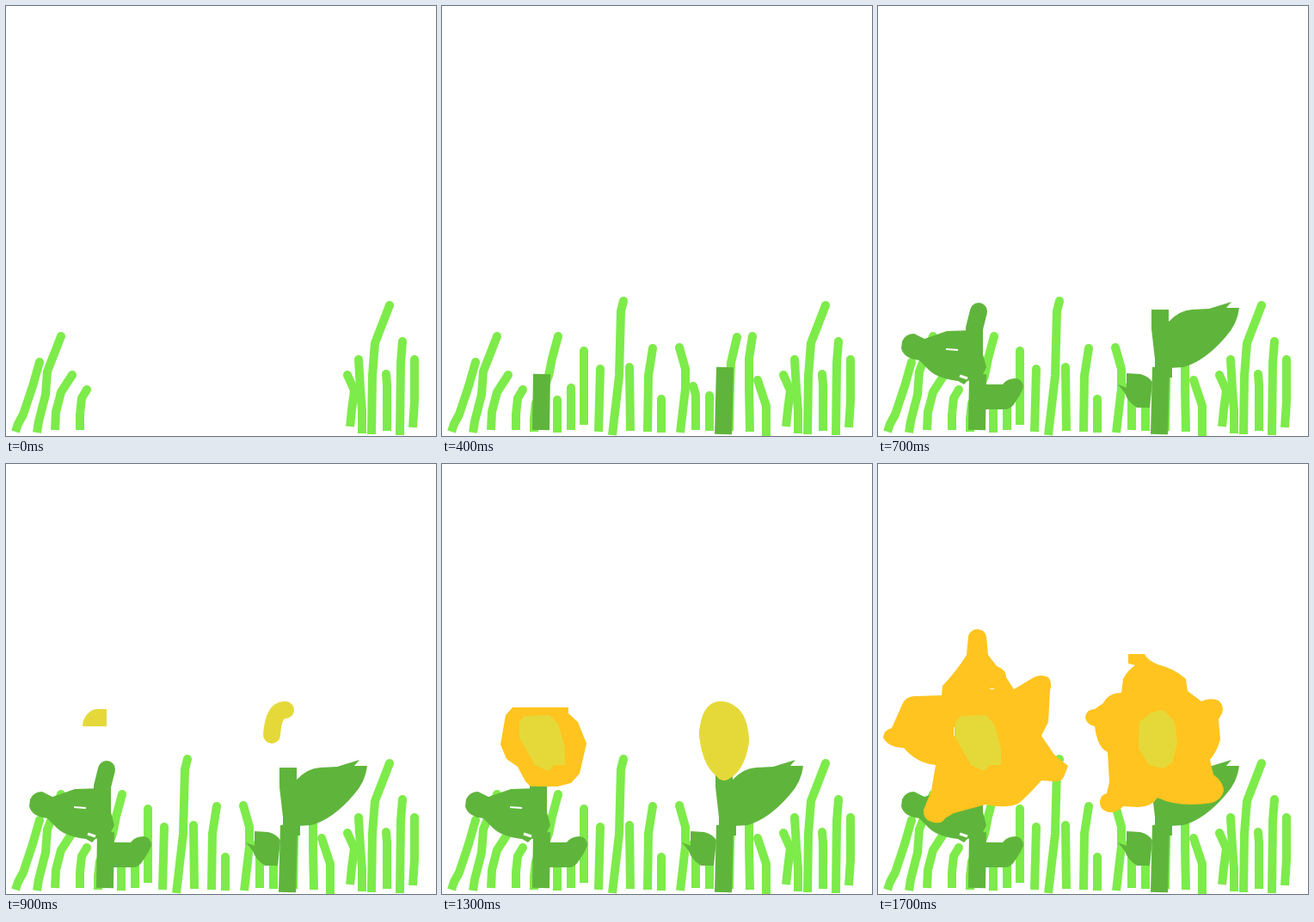
Write an HTML page with a canvas that moves like this. It is 500x500 px and loops after 1800 ms.

```html
<!DOCTYPE html>
<html>
<head>
<meta charset="utf-8">
<title>Growing flowers</title>
<style>
html, body { margin: 0; width: 100%; height: 100%; overflow: hidden; background: #fff; }
canvas { display: block; width: 500px; height: 500px; }
</style>
</head>
<body>
<canvas id="stage" width="500" height="500"></canvas>
<script>
const ctx = document.getElementById('stage').getContext('2d');
const LOOP = 1800;
const GRASS = '#7deb4a', LEAF = '#5fb53b', YELLOW = '#e5d93a', ORANGE = '#ffc41f';
const parts = [];

const fill = (start, color, d) => parts.push({ start, color, path: new Path2D(d) });
const line = (start, color, width, d, cap = 'butt') =>
  parts.push({ start, color, width, cap, path: new Path2D(d) });

// A blade has a round tip and a flat foot.
function blade(start, points, color = GRASS, width = 10) {
  const [x, y] = points.split(' ')[0].split(',');
  line(start, color, width, 'M' + points);
  line(start, color, width, `M${x},${y}h.01`, 'round');
}

[
  [0, '39,414 31,442 20,475 14,486 11,495'],
  [0, '64,384 48,425 46,452 38,483 36,496'],
  [0, '77,429 64,449 58,472 57,493'],
  [0, '94,446 88,456 86,475 86,493'],
  [0, '397,429 405,447 402,470 400,489'],
  [0, '410,411 412,445 414,470 414,497'],
  [0, '446,348 429,392 426,430 425,498'],
  [0, '442,428 443,440 443,494'],
  [0, '461,390 459,415 458,499'],
  [0, '475,411 475,460 473,490'],
  [100, '135,384 128,410 124,430 119,443 109,462 107,480 107,495'],
  [100, '134,458 134,496'],
  [100, '343,385 336,415 335,440 334,494'],
  [100, '361,384 357,410 357,445 358,495'],
  [100, '367,435 377,465 377,500'],
  [200, '165,401 165,487'],
  [200, '245,398 240,430 239,495'],
  [200, '255,457 255,496'],
  [200, '276,397 283,422 283,445 277,496'],
  [200, '292,442 295,452 295,493'],
  [200, '311,453 311,494'],
  [300, '150,444 150,493'],
  [300, '184,422 182,495'],
  [300, '211,343 208,355 206,430 198,499'],
  [300, '218,420 219,494']
].forEach(([start, points]) => blade(start, points));

// Stems
line(400, LEAF, 20, 'M116,428L115,493');
line(400, LEAF, 20, 'M329,420L327,498');
blade(500, '117,355 112,375 112,435', LEAF, 20);
line(500, LEAF, 20, 'M328,353V375L332,410V432');

// Leaves
fill(600, LEAF, 'M28,390Q32,381 42,381L54,387 80,378 110,377 122,405 126,420 120,432 104,436 100,440 93,436Q70,433 60,424L48,412Q30,410 27,398Z');
line(600, '#fff', 2, 'M79,399L93,400');
line(600, '#fff', 3, 'M95,430L104,433');
fill(600, LEAF, 'M338,367Q350,354 365,353L385,352 411,344 405,351 420,351Q418,370 404,385Q380,413 355,420L338,421 330,400Z');
fill(700, LEAF, 'M124,440H145Q150,433 160,433Q169,434 169,444Q166,452 160,460Q155,469 148,469H122Z');
fill(700, LEAF, 'M289,427L305,428Q316,431 319,438L316,467 301,467Q290,460 287,450L279,440 289,444Z');

// Flower hearts
line(900, YELLOW, 20, 'M117,295H105Q99,299 99,305');
line(900, YELLOW, 20, 'M309,315Q311,285 325,286', 'round');
line(1000, YELLOW, 20, 'M117,295H105Q99,299 99,305V320Q103,338 113,343L121,346');
line(1100, YELLOW, 20, 'M309,315Q311,285 325,286Q346,288 347,322Q343,350 328,358', 'round');
fill(1200, YELLOW, 'M92,290Q97,285 104,285H117Q148,286 154,322Q152,352 121,356Q104,352 95,338Q89,325 89,315Z');
fill(1200, YELLOW, 'M299,315Q302,276 325,276Q355,280 357,322Q352,360 328,368Q303,358 299,315Z');

// Orange rings, then petals
fill(1300, ORANGE, 'M68,326L74,292 82,283H147V290L158,300 168,325 160,360 150,371 134,375H103L97,369 88,352 75,343Z');
fill(1400, ORANGE, 'M95,284V272Q97,260 110,261Q121,245 131,262Q143,266 143,284Z');
fill(1400, ORANGE, 'M281,328Q280,318 286,310Q285,280 302,273Q318,270 330,266Q347,264 356,278Q367,295 367,325V350Q355,372 330,375Q308,378 300,366Q294,350 283,340Z');
fill(1500, ORANGE, 'M76,316H64Q52,316 52,326Q52,333 60,335L76,344Z');
fill(1500, ORANGE, 'M160,314H167Q176,318 176,326Q174,335 166,335H160Z');
fill(1500, ORANGE, 'M93,371L134,373 133,388Q127,397 116,397Q104,394 103,383Z');
fill(1600, ORANGE, 'M6,318Q7,309 16,307L28,280Q32,270 42,270L74,269 75,258Q92,240 103,222L105,200Q108,192 116,192Q125,193 126,201L128,222 138,235Q150,240 149,248L158,262 178,250Q188,243 198,248Q203,254 200,264L198,300 190,316 205,338Q213,345 221,351L216,364Q213,370 205,369L190,368Q175,385 163,395Q148,401 125,396L88,406 78,412Q74,420 62,416Q52,413 53,402L62,380 67,350Q45,348 30,330Q12,330 6,318Z');
fill(1700, ORANGE, 'M241,295Q242,285 252,285L262,278Q268,266 283,266L285,250Q290,240 299,234L291,232V221H310Q313,228 325,233Q345,238 358,250L360,264 376,276Q386,271 396,275Q403,281 400,290L396,297 398,320Q395,333 386,344L390,361Q402,370 402,380Q400,390 388,394Q350,400 325,388Q318,399 302,399L285,398Q278,406 268,405Q258,402 258,394Q258,385 266,383L269,370 267,335Q255,330 252,305Q243,303 241,295Z');

// Hearts stay visible inside the orange.
fill(1300, YELLOW, 'M90,300L96,293 125,292 135,302 143,330V350L130,350 124,357 108,350 90,318Z');
fill(1400, YELLOW, 'M304,300L318,289 332,286 345,300 348,325 342,347 332,354 315,350 303,330Z');
line(1400, '#fff', 1, 'M88.5,306V316');
line(1600, '#fff', 1, 'M130,261.5h5');

function draw(now) {
  const t = now % LOOP;
  ctx.fillStyle = '#fff';
  ctx.fillRect(0, 0, 500, 500);
  ctx.lineJoin = 'round';
  for (const p of parts) {
    if (t < p.start) continue;
    if (p.width) {
      ctx.strokeStyle = p.color;
      ctx.lineWidth = p.width;
      ctx.lineCap = p.cap;
      ctx.stroke(p.path);
    } else {
      ctx.fillStyle = p.color;
      ctx.fill(p.path);
    }
  }
}

const begin = performance.now();
function tick() {
  draw(performance.now() - begin);
  requestAnimationFrame(tick);
}
tick();
</script>
</body>
</html>
```
